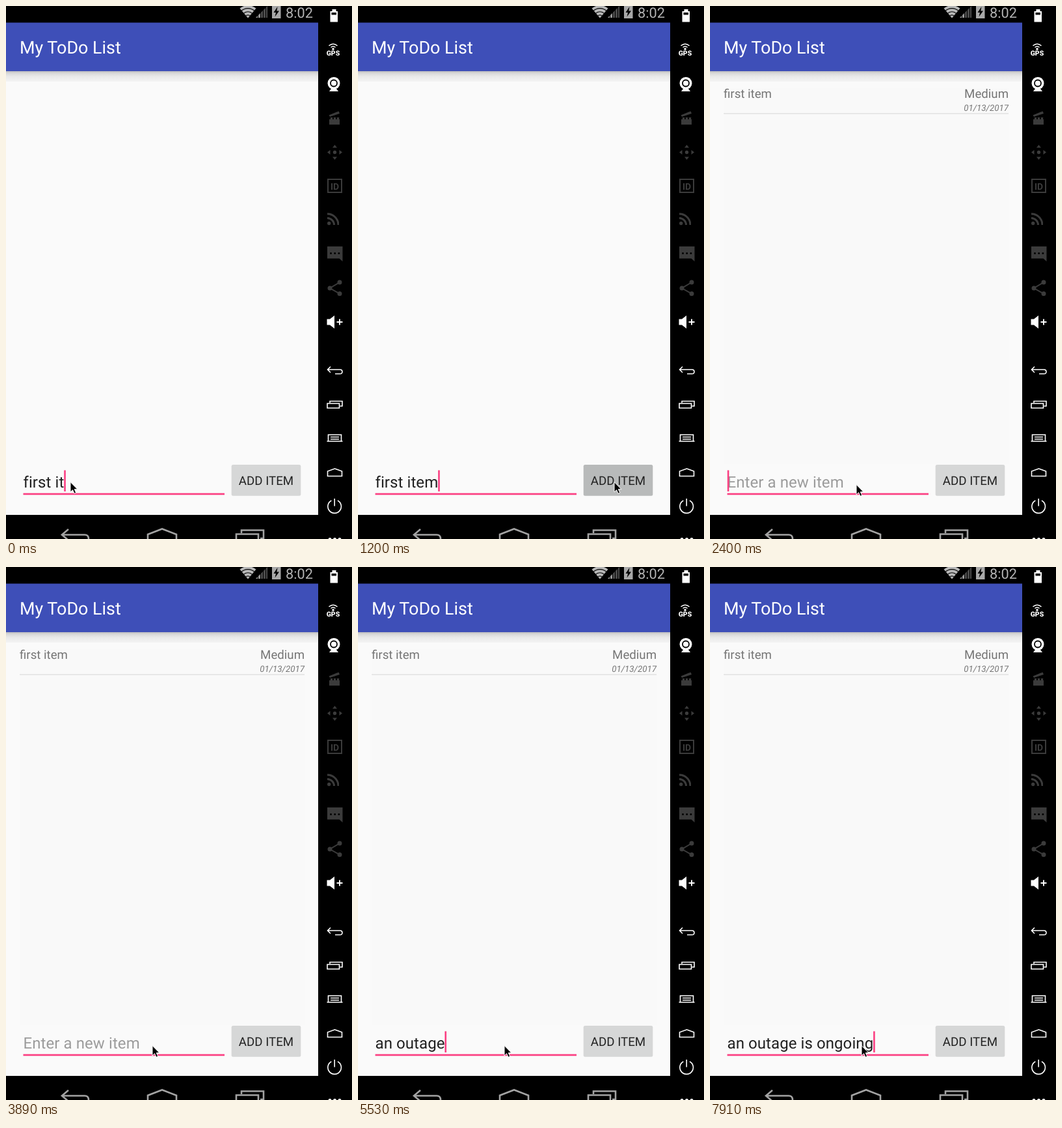
An HTML page for the animation above (8000 ms loop, 532 by 818 pixels).

```html
<!DOCTYPE html>
<html lang="en">
<head>
<meta charset="utf-8">
<title>To-do list</title>
<style>
html, body { margin: 0; width: 100%; height: 100%; overflow: hidden; background: #000; }
svg { display: block; }
text { font-family: Roboto, sans-serif; white-space: pre; text-rendering: geometricPrecision; }
.line { fill: none; stroke: #fff; stroke-width: 1.6; }
.dim { fill: #3b3b3b; }
.dimLine { fill: none; stroke: #3b3b3b; stroke-width: 2; }
.nav { fill: none; stroke: #a3a3a3; stroke-width: 2.6; }
.row { font-size: 18.67px; fill: #757575; }
.field { font-size: 24px; letter-spacing: .08px; }
.dots { fill: none; stroke-linecap: round; stroke-dasharray: 0 7.5; stroke-width: 5; }
</style>
</head>
<body>
<svg width="532" height="818" viewBox="0 0 532 818">
  <defs>
    <linearGradient id="shade" x2="0" y2="1">
      <stop offset="0" stop-color="#bebebe"/>
      <stop offset=".2" stop-color="#d9d9d9"/>
      <stop offset=".5" stop-color="#e9e9e9"/>
      <stop offset="1" stop-color="#f4f4f4"/>
    </linearGradient>
    <clipPath id="fan"><path d="M372 18.5L359 3V-3H385V3Z"/></clipPath>
    <clipPath id="slope"><path d="M384 18L402 0V18Z"/></clipPath>
    <clipPath id="corner"><path d="M494 317H512V336H494Z"/></clipPath>
    <path id="arrow" d="M0 -11.5L3.5 -7H-3.5Z"/>
  </defs>
  <rect width="532" height="818"/>

  <!-- status bar -->
  <g clip-path="url(#fan)" fill="none" stroke="#b8b8b8" stroke-width="4">
    <circle cx="372" cy="18.5" r="2"/>
    <circle cx="372" cy="18.5" r="7.2"/>
    <circle cx="372" cy="18.5" r="12.3"/>
    <circle cx="372" cy="18.5" r="17.4"/>
  </g>
  <g clip-path="url(#slope)" stroke-width="18" stroke-dasharray="3 1">
    <path d="M384 9H392" stroke="#999"/>
    <path d="M392 9H402" stroke="#4c4c4c"/>
  </g>
  <rect x="409" y="-3" width="13.5" height="22" fill="#a8a8a8"/>
  <path d="M417.5 1L411.5 10H415L413.5 16.5L420 7.500H416.3Z"/>
  <text x="430" y="17.5" font-size="21.7" fill="#b4b4b4">8:02</text>

  <!-- app -->
  <rect y="26" width="480" height="755" fill="#fafafa"/>
  <rect y="100" width="480" height="16" fill="url(#shade)"/>
  <rect y="25.5" width="480" height="74.5" fill="#3e4fb8"/>
  <text x="21" y="73" font-size="26.9" fill="#fff">My ToDo List</text>

  <g id="entry">
    <rect x="21" y="126" width="438" height="577" fill="#f9f9f9"/>
    <text class="row" x="21" y="141">first item</text>
    <text class="row" x="459" y="141" text-anchor="end">Medium</text>
    <text x="459" y="161" text-anchor="end" font-size="13.33" font-style="italic" fill="#757575">01/13/2017</text>
    <rect x="21" y="164.5" width="438" height="1.2" fill="#dcdcdc"/>
  </g>

  <rect x="26.5" y="747.6" width="309.5" height="2.7" fill="#fb3f82"/>
  <text id="hint" class="field" x="26.5" y="738.5" fill="#9c9c9c">Enter a new item</text>
  <text id="typed" class="field" x="26.5" y="738.5" fill="#212121"></text>
  <rect id="caret" y="712.5" width="2.6" height="32.5" fill="#fb3f82"/>
  <rect id="button" x="346.7" y="704" width="106.6" height="47.7" rx="2.5"/>
  <text x="400" y="735" text-anchor="middle" font-size="18.7" fill="#212121">ADD ITEM</text>

  <!-- navigation bar -->
  <g class="nav">
    <path d="M96 803L86 811.5L96 820M86 811.5H121Q127 811.5 127 818V822"/>
    <path d="M218 822V811L240 802.5L262 811V822"/>
    <path d="M362 809V804.5H396V817H391M354 822V810.5H388V822"/>
  </g>

  <!-- side toolbar -->
  <g fill="#fff">
    <path d="M501.5 5H507.5V8H510V24.5H498.5V8H501.5Z"/>
    <rect x="500.5" y="10" width="7.5" height="3.5" fill="#000"/>
    <circle cx="503" cy="66" r="1.8"/>
    <path class="line" d="M499.5 63.5Q503 60.5 506.5 63.5M496.5 61Q503 55.5 509.5 61"/>
    <text x="503" y="76" text-anchor="middle" font-size="10.5" font-weight="900">GPS</text>
    <circle cx="504" cy="118.5" r="9.5"/>
    <circle cx="504" cy="118.5" r="5" fill="none" stroke="#000" stroke-width="1.8"/>
    <path d="M500 127H508L511 131H497Z"/>
    <path d="M493.5 480.5H498L505 475V495L498 489.5H493.5Z"/>
  </g>
  <g class="dim">
    <path d="M497 171H513V182H497ZM496.5 167.5L511.5 161.5L513 165L498 170Z"/>
    <path d="M497 172.5H513" stroke="#000" stroke-width="2.5" stroke-dasharray="2 3"/>
    <g transform="translate(505.5 224.5)">
      <circle r="2.7"/>
      <use href="#arrow"/>
      <use href="#arrow" transform="rotate(90)"/>
      <use href="#arrow" transform="rotate(180)"/>
      <use href="#arrow" transform="rotate(270)"/>
    </g>
    <rect class="dimLine" x="495" y="266" width="21" height="20"/>
    <text x="505.5" y="281.5" text-anchor="middle" font-size="14" font-weight="700">ID</text>
    <circle cx="496.7" cy="333.5" r="2.7"/>
    <g clip-path="url(#corner)" fill="none" stroke="#3b3b3b" stroke-width="3">
      <circle cx="494" cy="336" r="10.5"/>
      <circle cx="494" cy="336" r="17"/>
    </g>
    <path d="M494 369H517.5V392L512.5 387.5H494Z"/>
    <path class="dots" d="M499.5 379.5h12.6" stroke="#000" style="stroke-width:3; stroke-dasharray:0 6.2"/>
    <path class="dimLine" d="M513 424L498 433L513 441.5"/>
    <circle cx="513" cy="424" r="3.5"/>
    <circle cx="498" cy="433" r="3.5"/>
    <circle cx="513" cy="441.5" r="3.5"/>
  </g>
  <g class="line">
    <path d="M508.5 485H517.5M513 480.5V489.5" stroke-width="2"/>
    <path d="M499 553.5L494.5 558L499 562.5M494.5 558H513.5Q517 558 517 561.3T513.5 564.5H506"/>
    <path d="M498 609V606.5H517V614H513.5M494 610H512.5V617H494Z"/>
    <path d="M495.5 668V658H515.5V668M493.5 668H517.5M499 661.5H512M499 664.7H512"/>
    <path d="M494.5 721.5V714L505.5 710L516.5 714V721.5Z"/>
    <path d="M500.3 759A10.3 10.3 0 1 0 510 759M505.2 756V767.5"/>
  </g>
  <path class="dots" d="M498 818.5h15.1" stroke="#fff"/>

  <path id="mouse" d="M0 0V15.5L3.6 12.2L6 17.8L8.7 16.6L6.3 11.2H11Z" fill="#000" stroke="#fff"/>
</svg>
<script>
const LOOP = 8000;
const TICK = 149.1; // the screen refreshes once per tick; all times below are in ticks
const PRESS = 8, SUBMIT = 10;
const BLINK = 3.28;

const bursts = [
  { start: 0, end: 0, text: 'first it' },
  { start: 1, end: 1, text: 'em' },
  { start: SUBMIT, end: SUBMIT, text: '', clear: true },
  { start: 30, end: 35, text: 'an outag' },
  { start: 37, end: 40, text: 'e is ' },
  { start: 43, end: 44, text: 'on' },
  { start: 47, end: 51, text: 'going' }
];
const glides = [
  { start: 3, end: 8, dx: 295, dy: 0 },
  { start: 10, end: 13, dx: -169, dy: 4 },
  { start: 52, end: 53, dx: 8, dy: 0 }
];

const $ = id => document.getElementById(id);
const show = (id, on) => $(id).setAttribute('visibility', on ? 'visible' : 'hidden');
const smooth = p => p * p * (3 - 2 * p);

function fieldAt(tick) {
  let text = '', edited = 0;
  for (const burst of bursts.filter(b => b.start <= tick)) {
    edited = Math.min(tick, burst.end);
    const done = (edited - burst.start + 1) / (burst.end - burst.start + 1);
    const part = burst.text.slice(0, Math.round(burst.text.length * done));
    text = burst.clear ? '' : text + part;
  }
  // The caret stays lit after each edit, then blinks.
  const caret = Math.floor((tick - edited + 0.6) / BLINK) % 2 === 0;
  return { text, caret };
}

function pointerAt(tick) {
  let x = 99, y = 730.5;
  for (const { start, end, dx, dy } of glides) {
    const p = smooth(Math.min(1, Math.max(0, (tick - start) / (end - start))));
    x += dx * p;
    y += dy * p;
  }
  return [x, y];
}

function draw(now) {
  const tick = Math.floor(now % LOOP / TICK);
  const { text, caret } = fieldAt(tick);
  const pressed = tick >= PRESS && tick < SUBMIT;
  $('typed').textContent = text;
  const width = text ? $('typed').getComputedTextLength() : 0;
  $('caret').setAttribute('x', 26.7 + Math.max(0, width - 0.3));
  $('button').setAttribute('fill', pressed ? '#b8baba' : '#d6d7d7');
  $('mouse').setAttribute('transform', `translate(${pointerAt(tick)})`);
  show('hint', !text);
  show('caret', caret);
  show('entry', tick >= SUBMIT);
  requestAnimationFrame(() => draw(performance.now()));
}
draw(0);
</script>
</body>
</html>
```
